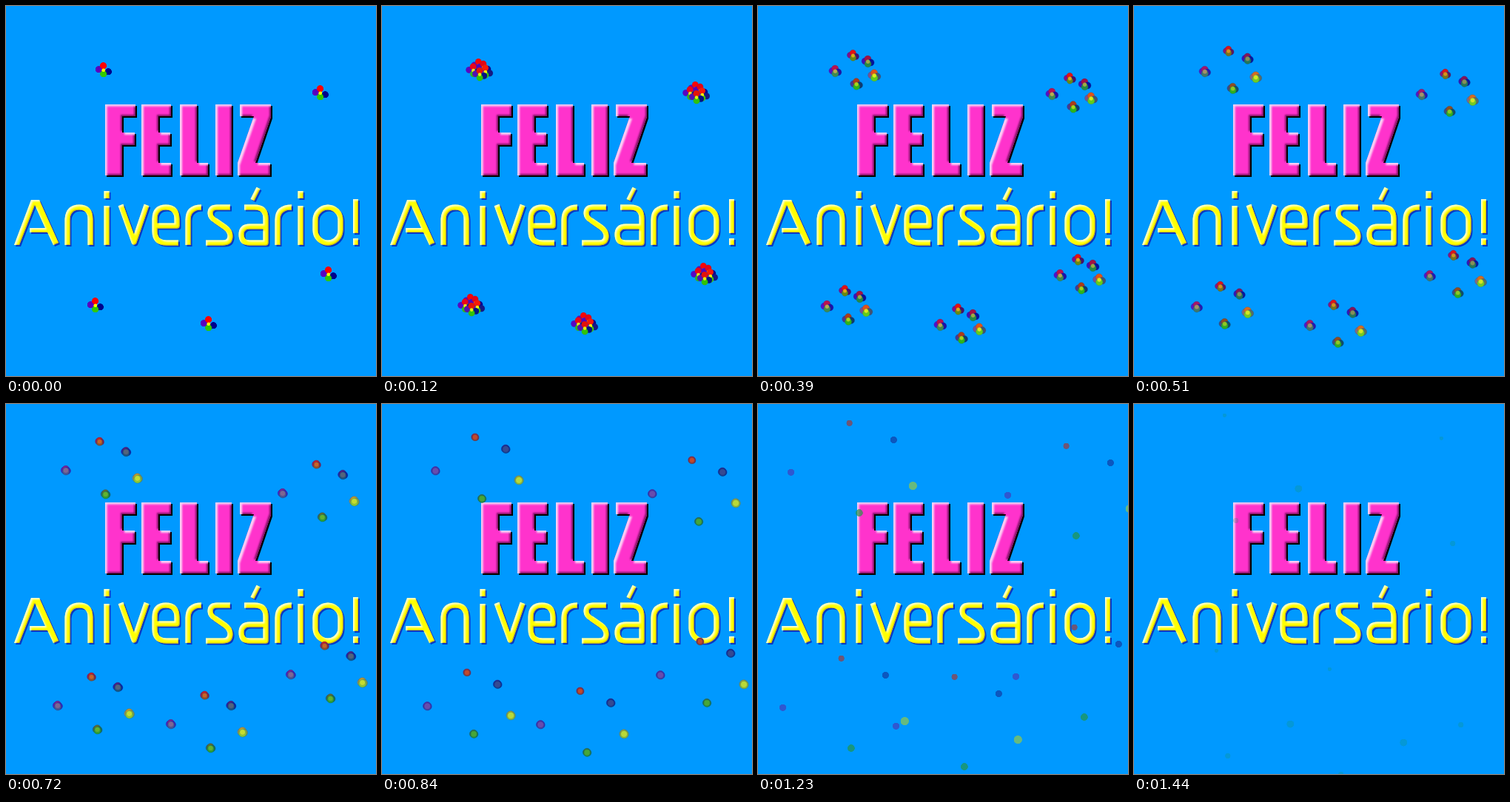
These frames come from a looping animation (500x500 px, 1.47 s). An HTML page:

```html
<!DOCTYPE html>
<html lang="pt">
<head>
<meta charset="utf-8">
<title>Feliz Aniversário!</title>
<style>
html, body { margin: 0; width: 100%; height: 100%; overflow: hidden; background: #0099ff; }
svg { display: block; width: 100vw; height: 100vh; }
</style>
</head>
<body>
<svg viewBox="0 0 500 500" role="img" aria-label="Feliz Aniversário!">
  <defs>
    <filter id="pinkBevel" filterUnits="userSpaceOnUse" x="120" y="120" width="255" height="125" color-interpolation-filters="sRGB">
      <feOffset in="SourceAlpha" dx="2.6" dy="2.6"/>
      <feGaussianBlur stdDeviation="1.1" result="low"/>
      <feOffset in="SourceAlpha" dx="-2" dy="-2"/>
      <feGaussianBlur stdDeviation="1" result="high"/>
      <feFlood flood-color="#ffd0f5"/>
      <feComposite in2="SourceAlpha" operator="in"/>
      <feComposite in2="low" operator="out" result="light"/>
      <feFlood flood-color="#7d1263"/>
      <feComposite in2="SourceAlpha" operator="in"/>
      <feComposite in2="high" operator="out" result="shade"/>
      <feOffset in="SourceAlpha" dx="2" dy="2"/>
      <feGaussianBlur stdDeviation=".5" result="drop"/>
      <feMerge>
        <feMergeNode in="drop"/><feMergeNode in="SourceGraphic"/>
        <feMergeNode in="shade"/><feMergeNode in="light"/>
      </feMerge>
    </filter>
    <filter id="goldBevel" filterUnits="userSpaceOnUse" x="0" y="235" width="500" height="100" color-interpolation-filters="sRGB">
      <feOffset in="SourceAlpha" dx="2" dy="2"/>
      <feGaussianBlur stdDeviation=".8" result="low"/>
      <feOffset in="SourceAlpha" dx="-1.2" dy="-1.2"/>
      <feGaussianBlur stdDeviation=".6" result="high"/>
      <feFlood flood-color="#ffffdc"/>
      <feComposite in2="SourceAlpha" operator="in"/>
      <feComposite in2="low" operator="out" result="light"/>
      <feFlood flood-color="#d2be14"/>
      <feComposite in2="SourceAlpha" operator="in"/>
      <feComposite in2="high" operator="out" result="shade"/>
      <feOffset in="SourceAlpha" dx="2" dy="2"/>
      <feGaussianBlur stdDeviation=".6" result="soft"/>
      <feFlood flood-color="#0838c4"/>
      <feComposite in2="soft" operator="in" result="drop"/>
      <feMerge>
        <feMergeNode in="drop"/><feMergeNode in="SourceGraphic"/>
        <feMergeNode in="shade"/><feMergeNode in="light"/>
      </feMerge>
    </filter>
  </defs>
  <rect width="500" height="500" fill="#0099ff"/>
  <g filter="url(#pinkBevel)" fill="#ff33cc">
    <path d="M134 133H175V149H157V171H174V188H157V229H134Z"/>
    <path d="M183 133H223V149H206V171H222V188H206V212H223V229H183Z"/>
    <path d="M235 133H258V212H273V229H235Z"/>
    <path d="M283 133H305V229H283Z"/>
    <path d="M316 133H358V150L337 212H357V229H313V212L335 149H316Z"/>
  </g>
  <g filter="url(#goldBevel)" fill="none" stroke="#ffff00" stroke-width="7" stroke-linejoin="round">
    <path fill="#ffff00" stroke="none" d="M11 323L34 262H45L71 320L64 323L56 306H32V300H53L39 269L18 323Z"/>
    <path d="M83 323V288Q84 272 99 272Q114 272 114 288V323"/>
    <path d="M136 270V323M136 250V260M398 270V323M398 250V260"/>
    <path d="M155 269L173 319L190 269"/>
    <path d="M201 297H231V288Q231 272 216 272Q201 272 201 288V304Q201 320 217 320H233"/>
    <path d="M246 323V289Q246 272 264 272M367 323V289Q367 272 386 272"/>
    <path d="M303 272H285Q276 272 276 280Q276 286 283 290L296 299Q303 304 303 311Q303 320 293 320H270"/>
    <path d="M322 272H336Q351 272 351 287V320H329Q318 320 318 309Q318 298 329 298H351"/>
    <path stroke-width="5.5" d="M333 262L341 246"/>
    <rect x="418" y="272" width="34" height="48" rx="17"/>
    <path d="M472.5 261V307M472.5 314V323"/>
  </g>
  <g id="sparks"></g>
</svg>
<script>
const LOOP = 1470, STEP = 30, MERGE = 990, FADE = 450;
const TEAL = [20, 150, 100], EDGE = [0, 50, 120];

// Burst positions relative to the first one
const bursts = [[0, 0], [293, 31], [304, 276], [-11, 318], [142, 343]];

// Petals: offset x, y and colour; the last one is the heart
const petals = [
  [-6.5, -1, [90, 0, 190]],
  [-0.3, -6, [255, 0, 0]],
  [6.5, 2, [0, 0, 140]],
  [0, 5, [50, 200, 0]],
  [0, 0, [255, 255, 0]]
];

// Dots: start, speed in px/ms, colour, radius when merged and at the end
const dots = [
  { x: 130.7, y: 86.2, vx: -.0058, vy: -.0492, color: [184, 40, 52], r: 4, end: 2.3 },
  { x: 132.4, y: 87.6, vx: .0414, vy: -.0318, color: [18, 42, 172], r: 5, end: 0 },
  { x: 132.1, y: 86.4, vx: -.0712, vy: .0047, color: [78, 44, 204], r: 5, end: 0 },
  { x: 133, y: 86.5, vx: .062, vy: .0195, color: [172, 210, 66], r: 5.4, end: 4.6 },
  { x: 131.3, y: 86.5, vx: .0045, vy: .0493, color: [38, 150, 66], r: 4.8, end: 3.3 }
];

const mix = (a, b, k) => a + (b - a) * k;
const blend = (a, b, k) => a.map((v, i) => mix(v, b[i], k));
const rgb = c => `rgb(${c.map(Math.round)})`;

function add(parent, tag) {
  return parent.appendChild(document.createElementNS("http://www.w3.org/2000/svg", tag));
}

const layer = document.getElementById("sparks");
const sparks = bursts.flatMap(([bx, by]) => dots.map(dot => {
  const g = add(layer, "g");
  return { bx, by, dot, g, parts: petals.map(() => add(g, "circle")) };
}));

function draw(t) {
  const k = Math.min(1, t / MERGE);
  const p = Math.max(0, (t - MERGE) / FADE);
  const late = p ** 3;
  // All flowers start on the same spot
  const settle = Math.min(1, t / 240);
  for (const { bx, by, dot, g, parts } of sparks) {
    const x = mix(131.8, dot.x, settle) + dot.vx * t + bx;
    const y = mix(86.8, dot.y, settle) + dot.vy * t + by;
    g.setAttribute("transform", `translate(${x.toFixed(2)} ${y.toFixed(2)})`);
    g.setAttribute("opacity", 1 - .75 * p ** 1.4);
    parts.forEach((c, i) => {
      const [px, py, color] = petals[i];
      const r = i === 4 ? mix(2.3, dot.r, k * k) : mix(4.3, dot.r, k);
      const fill = blend(blend(color, dot.color, k), TEAL, late);
      c.setAttribute("cx", px * (1 - k));
      c.setAttribute("cy", py * (1 - k));
      c.setAttribute("r", mix(r, dot.end, late));
      c.setAttribute("fill", rgb(fill));
      c.setAttribute("stroke", rgb(blend(fill, EDGE, .5)));
      c.setAttribute("stroke-opacity", .6 * k * Math.max(0, 1 - 2 * p));
    });
  }
}

function tick() {
  const t = performance.now() % LOOP;
  draw(Math.floor(t / STEP) * STEP);
  requestAnimationFrame(tick);
}
tick();
</script>
</body>
</html>
```
